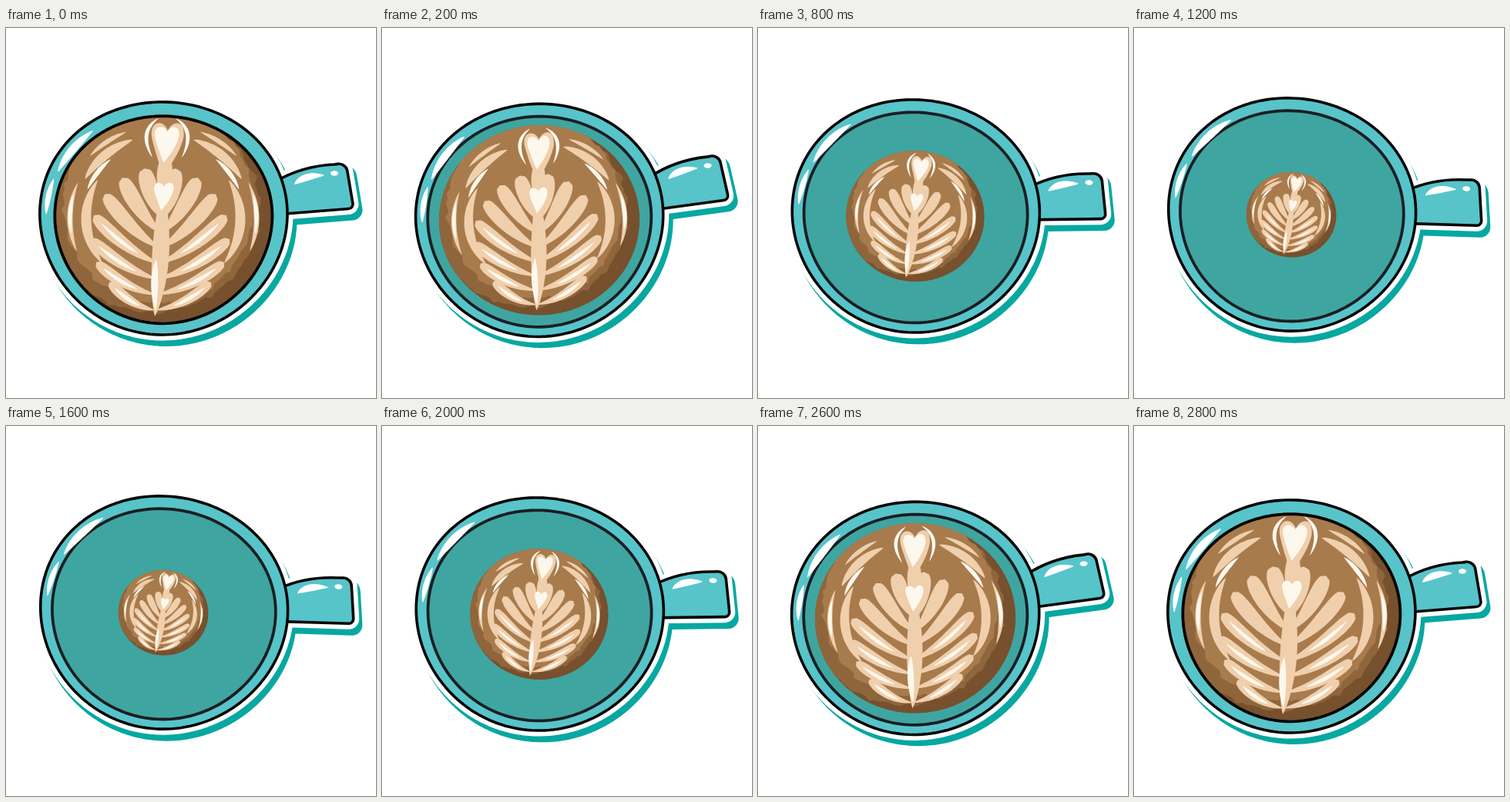
An HTML page with a canvas for the animation above (3 s loop, 480 by 480 pixels).

```html
<!DOCTYPE html>
<html lang="en">
<head>
<meta charset="utf-8">
<title>Latte cup</title>
<style>
html, body { margin: 0; width: 100%; height: 100%; overflow: hidden; background: #fff; }
canvas { display: block; width: 100vw; height: 100vh; }
</style>
</head>
<body>
<canvas id="stage"></canvas>
<script>
const canvas = document.getElementById('stage');
const ctx = canvas.getContext('2d');
const ratio = window.devicePixelRatio || 1;
canvas.width = canvas.height = 480 * ratio;

const STEP = 200, POSES = 15;
const PIVOT = { x: 247, y: 246 };
const CENTER = { x: 204, y: 247 };
// Tilt in degrees for one half of the swing; the second half mirrors it.
const TILT = [0, -3.2, -9.5, -3.2, 3.8, 11, 6.3, 0];

const TEAL = '#57c4ca', DEEP = '#3fa5a1', SHADOW = '#06a8a1';
const BLACK = '#050505', LINE = '#1c1e22', WHITE = '#fff';
const CREAM = '#f0cfac', MILK = '#fdf8ee';
const BROWN = '#a87b4d', MID = '#8f653c', DARK = '#77502e';

const rad = deg => deg * Math.PI / 180;

function polygon(points) {
  const path = new Path2D();
  points.forEach(p => path.lineTo(...p));
  path.closePath();
  return path;
}

// Round shape whose radius is scaled by wobble(angle, index).
function blob(x, y, rx, ry, wobble, count = 180) {
  return polygon(Array.from({ length: count }, (_, i) => {
    const a = 2 * Math.PI * i / count, r = wobble(a, i);
    return [x + rx * r * Math.cos(a), y + ry * r * Math.sin(a)];
  }));
}

// Hand-drawn roundness: fuller at the upper right, flatter below it.
const ring = (y, rx, ry) => blob(204, y, rx, ry, a => 1 + 0.01 * Math.cos(3 * (a + rad(25))));

function brushed(x, y, rx, ry, seed) {
  return blob(x, y, rx, ry, (a, i) => {
    seed = seed * 16807 % 2147483647;
    return 1 + 0.05 * (i % 5) / 4 * seed / 2147483647;
  }, 120);
}

// Stroke along curve(t) that swells and tapers; skew below 1 rounds the start.
function taper(curve, width, skew = 1, from = 0, to = 1) {
  const left = [], right = [];
  for (let i = 0; i <= 30; i++) {
    const t = from + (to - from) * i / 30;
    const [x, y] = curve(t), [x2, y2] = curve(t + 0.001);
    const swell = Math.max(0, Math.sin(Math.PI * (i / 30) ** skew)) ** 0.75;
    const half = width / 2 * swell / Math.hypot(x2 - x, y2 - y);
    left.push([x - (y2 - y) * half, y + (x2 - x) * half]);
    right.unshift([x + (y2 - y) * half, y - (x2 - x) * half]);
  }
  return polygon(left.concat(right));
}

const quad = (x0, y0, cx, cy, x1, y1) => t => {
  const u = 1 - t;
  return [u * u * x0 + 2 * u * t * cx + t * t * x1, u * u * y0 + 2 * u * t * cy + t * t * y1];
};

// Arc around the cup's middle, in degrees clockwise from the top.
const arc = (r, from, to) => t => {
  const a = rad(from + (to - from) * t);
  return [CENTER.x + r * Math.sin(a), CENTER.y - r * 0.945 * Math.cos(a)];
};

function heart(x, y, w, h) {
  const path = new Path2D();
  path.moveTo(x, y);
  path.bezierCurveTo(x - w * 0.15, y - h * 0.28, x - w * 0.62, y - h * 0.2, x - w * 0.5, y + h * 0.18);
  path.quadraticCurveTo(x - w * 0.42, y + h * 0.45, x - w * 0.15, y + h);
  path.quadraticCurveTo(x + w * 0.4, y + h * 0.5, x + w * 0.5, y + h * 0.14);
  path.bezierCurveTo(x + w * 0.56, y - h * 0.24, x + w * 0.15, y - h * 0.24, x, y);
  return path;
}

function makeHandle() {
  const path = new Path2D();
  path.moveTo(350, 199);
  path.quadraticCurveTo(384, 179, 426, 177);
  path.arcTo(441, 175, 451, 234, 11);
  path.arcTo(451, 234, 366, 241, 6);
  path.lineTo(350, 242);
  path.closePath();
  return path;
}

function makeArt() {
  const cream = [], milk = [];
  for (const side of [-1, 1]) {
    for (let i = 0; i < 7; i++) {
      const a = rad(13 + 20 * i);
      const tip = [200 + side * 90 * Math.sin(a), 269 - 89 * Math.cos(a)];
      const joint = [203 - 1.6 * i, 246 + 20 * i];
      const bend = [(tip[0] + joint[0]) / 2 + side * 3, (tip[1] + joint[1]) / 2 + 13];
      const curve = quad(...tip, ...bend, ...joint);
      cream.push(taper(curve, 22 - 1.4 * i, 0.5));
      if (i > 2) milk.push(taper(curve, 5, 1, 0.12, 0.7));
    }
    cream.push(
      taper(arc(100, side * 58, side * 128), 13),
      taper(arc(115, side * 20, side * 62), 12),
      taper(arc(128, side * 22, side * 48), 6),
      taper(arc(121, side * 66, side * 112), 7));
    milk.push(
      taper(arc(121, side * 74, side * 100), 5),
      taper(arc(106, side * 40, side * 68), 6),
      taper(quad(209 + side * 11, 117, 209 + side * 38, 134, 209 + side * 19, 168), 5));
  }
  cream.push(
    taper(quad(203, 205, 203, 300, 193, 374), 22),
    taper(quad(208, 155, 206, 190, 203, 225), 20),
    heart(210, 133, 41, 58));
  milk.push(
    taper(quad(195, 300, 191, 330, 194, 366), 9),
    heart(209, 135, 31, 40),
    heart(205, 206, 25, 31));
  return { cream, milk };
}

const cup = ring(245.5, 160.5, 151);
const handle = makeHandle();
const well = ring(247.5, 145, 136.5);
const fullWell = ring(247.5, 141, 134.5);
const coffee = blob(CENTER.x, CENTER.y, 142, 134.5, () => 1);
const midTone = brushed(190, 236, 137, 131, 11);
const lightTone = brushed(198, 229, 122, 126, 29);
const art = makeArt();
const shine = [
  taper(arc(151, -37, -65), 10),
  taper(arc(152, -69, -88), 7),
  taper(quad(374, 203, 386, 191, 413, 191), 9),
  blob(426, 188.5, 5, 3.2, () => 1)
];

function fill(path, color) {
  ctx.fillStyle = color;
  ctx.fill(path);
}

function outline(path, color, edge, width) {
  fill(path, color);
  ctx.strokeStyle = edge;
  ctx.lineWidth = width;
  ctx.stroke(path);
}

function mug(color, edge, width, dx = 0, dy = 0) {
  ctx.save();
  ctx.translate(dx, dy);
  outline(handle, color, edge, width);
  outline(cup, color, edge, width);
  ctx.restore();
}

function drawCoffee(scale) {
  ctx.save();
  ctx.translate(CENTER.x, CENTER.y);
  ctx.scale(scale, scale);
  ctx.translate(-CENTER.x, -CENTER.y);
  ctx.clip(coffee);
  fill(coffee, DARK);
  fill(midTone, MID);
  fill(lightTone, BROWN);
  art.cream.forEach(p => fill(p, CREAM));
  art.milk.forEach(p => fill(p, MILK));
  ctx.restore();
}

function draw(time) {
  const step = Math.floor(time / STEP) % POSES;
  const pose = Math.min(step, POSES - 1 - step);
  const full = pose === 0;

  ctx.setTransform(ratio, 0, 0, ratio, 0, 0);
  ctx.fillStyle = WHITE;
  ctx.fillRect(0, 0, 480, 480);
  ctx.lineJoin = 'round';
  ctx.translate(PIVOT.x, PIVOT.y);
  ctx.rotate(rad(TILT[pose]));
  ctx.translate(-PIVOT.x, -PIVOT.y);

  mug(SHADOW, SHADOW, 15, 5, 7.5);
  mug(WHITE, WHITE, 15);
  mug(TEAL, BLACK, 3.6);

  const inner = full ? fullWell : well;
  fill(inner, DEEP);
  drawCoffee(1 - 0.08 * pose - 0.003 * pose * pose);
  ctx.strokeStyle = full ? BLACK : LINE;
  ctx.lineWidth = 3.8;
  ctx.stroke(inner);
  shine.forEach(p => fill(p, WHITE));
}

const start = performance.now();
function tick() {
  draw(performance.now() - start);
  requestAnimationFrame(tick);
}
tick();
</script>
</body>
</html>
```
